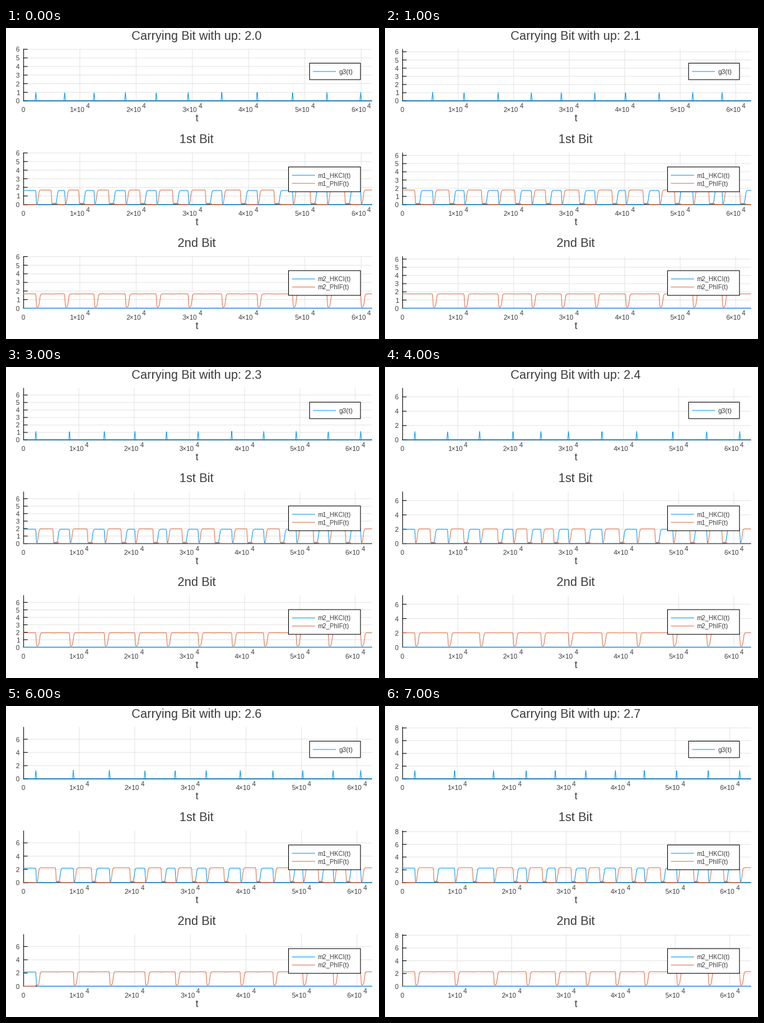
A matplotlib script for the animation above (8000 ms loop, 600 by 500 pixels).

```python
import random

import matplotlib.pyplot as plt
import numpy as np
from matplotlib.animation import FuncAnimation
from matplotlib.patches import Rectangle

W, H = 600, 500
LEFT, RIGHT, HEIGHT = 28.3, 588.3, 83
BASES = [117.2 + 166.67 * i for i in range(3)]
BLUE, ORANGE, INK = "#009afa", "#e36f47", "#3c3c3c"
plt.rcParams["font.family"] = "Liberation Sans"

# Per run: simulated time span, x of the toggles a quarter, half and
# three quarters of the way through
RUNS = [
    (61880, 165, 293, 431),
    (62700, 182, 312, 441),
    (68850, 181, 305, 440),
    (63000, 185, 309, 440),
    (63050, 181, 295, 434),
    (62650, 190, 309, 445),
    (62640, 199, 322, 456),
    (63850, 206, 323, 443),
]
PH_FIRST = (1, 2)   # runs whose first bit starts with PhIF high
HK2_FIRST = (6,)    # runs whose second bit starts with HKCI high
TOGGLES = 21

fig = plt.figure(figsize=(W / 100, H / 100), dpi=100, facecolor="white")
ax = fig.add_axes([0, 0, 1, 1])
X = np.arange(LEFT, RIGHT + 0.1, 0.25)


def toggle_times(run):
    """Toggles of the first bit: key points joined by slightly uneven steps."""
    rng = random.Random(run)
    k = np.arange(TOGGLES)
    xs = np.interp(k, [0, 5, 10, 15, 20], [48, *RUNS[run][1:], 570.5])
    jitter = np.array([rng.uniform(-2.5, 2.5) for _ in k])
    return list(xs + jitter * (k % 5 != 0))


def rise(center, width):
    return 1 / (1 + np.exp(-np.clip((X - center) / width, -50, 50)))


def fall(center):
    return 1 - rise(center + 0.5, 0.25)


def carry(pulses):
    y = np.zeros_like(X)
    for p in pulses:
        y = np.maximum(y, 14 * np.clip(1 - np.abs(X - p) / 1.2, 0, 1))
    return y


def first_bit(run, pulses, resets):
    level = 23.2 + 0.08 * run
    delay = 9.5 - 0.35 * run
    hk, ph = np.zeros_like(X), np.zeros_like(X)
    ph_spans = list(zip(pulses, resets[run in PH_FIRST:] + [999]))
    hk_spans = list(zip(resets, pulses[run not in PH_FIRST:] + [999]))
    if run in PH_FIRST:
        ph_spans.append((-99, resets[0]))
    else:
        hk_spans.append((-99, pulses[0]))
    for start, end in ph_spans:
        ph += level * rise(start + 4, 0.7) * fall(end)
    for start, end in hk_spans:
        hk += (level - 0.7) * rise(start + delay, 0.65) * fall(end)
    for r in resets:
        low = 1.6 * rise(r + 1, 0.3) * fall(r + delay)
        hk += 0.7 * low
        ph += low
    return hk, ph


def second_bit(run, pulses, resets):
    level = 22.9 + 0.05 * run
    hk, ph = np.zeros_like(X), np.ones_like(X)
    for p in pulses:
        ph *= 1 - 0.93 * (rise(p + 0.5, 0.25) - rise(p + 6, 0.65))
    for r in resets:
        ph -= 0.018 * np.exp(-((X - r - 1) / 2) ** 2)
    if run in HK2_FIRST:
        hk = 0.98 * level * fall(pulses[0])
        ph *= rise(pulses[0] + 1, 0.3)
    return hk, ph * level


def label(x, y, s, size, ha="center"):
    ax.text(x, y, s, fontsize=size * 0.72, color=INK, ha=ha, va="baseline", zorder=6)


def line(xs, ys, color, z=3):
    ax.plot(xs, ys, color=color, lw=0.72, zorder=z, solid_joinstyle="round",
            snap=False)


def frame_axes(base, up, span, title):
    top = base - HEIGHT
    for v in range(0, int(3 * up + 1e-6) + 1, 1 if up < 2.35 else 2):
        y = base - HEIGHT * v / (3 * up)
        line([LEFT, RIGHT], [y, y], "#e5e5e5", 1)
        line([LEFT, LEFT + 6], [y, y], "black", 2)
        label(21.8, y + 4.2, str(v), 10.8, "right")
    for k in range(int(span // 10000) + 1):
        x = LEFT + (RIGHT - LEFT) * k * 10000 / span
        line([x, x], [top, base], "#e5e5e5", 1)
        if k:
            label(x + 7.7, base + 18.2, f"{k}×10", 10.6, "right")
            label(x + 9.8, base + 11.7, "4", 10.6, "left")
        else:
            label(x - 1, base + 18.2, "0", 10.6)
    line([LEFT, LEFT], [top, base], "black", 2)
    line([LEFT, RIGHT], [base, base], "black", 2)
    label(306.5, base - 98.5, title, 19.6)
    label(307, base + 33.2, "t", 15.5)


def legend(x, y, height, names, size):
    ax.add_patch(Rectangle((x, y), 570.2 - x, height, fc="white", ec="black",
                           lw=0.72, zorder=5, snap=False))
    for i, (name, color) in enumerate(zip(names, (BLUE, ORANGE))):
        row = y + 13.4 + 13 * i
        line([x + 6, x + 42], [row, row], color, 6)
        label(x + 47, row + 3.9, name, size, "left")


def draw(run):
    ax.clear()
    ax.set(xlim=(0, W), ylim=(H, 0))
    ax.axis("off")
    up = 2 + run / 10
    events = toggle_times(run)
    first = int(run in PH_FIRST)
    pulses, resets = events[first::2], events[1 - first::2]

    panels = [
        (f"Carrying Bit with up: {up:.1f}", [carry(pulses)]),
        ("1st Bit", first_bit(run, pulses, resets)),
        ("2nd Bit", second_bit(run, pulses, resets)),
    ]
    for i, (base, (title, curves)) in enumerate(zip(BASES, panels)):
        frame_axes(base, up, RUNS[run][0], title)
        # The first series lies on top along the zero line of the second bit
        for curve, color in zip(curves, (BLUE, ORANGE)):
            line(X, base - 0.2 - curve, color)
        if i == 0:
            legend(488.3, base - 60.7, 26.5, ["g3(t)"], 10.8)
        else:
            names = [f"m{i}_HKCI(t)", f"m{i}_PhIF(t)"]
            legend(454.5, base - 60.5, 39.8, names, 10)


anim = FuncAnimation(fig, draw, frames=8, interval=1000, repeat=True,
                     repeat_delay=0, init_func=lambda: draw(0))
plt.show()
```
